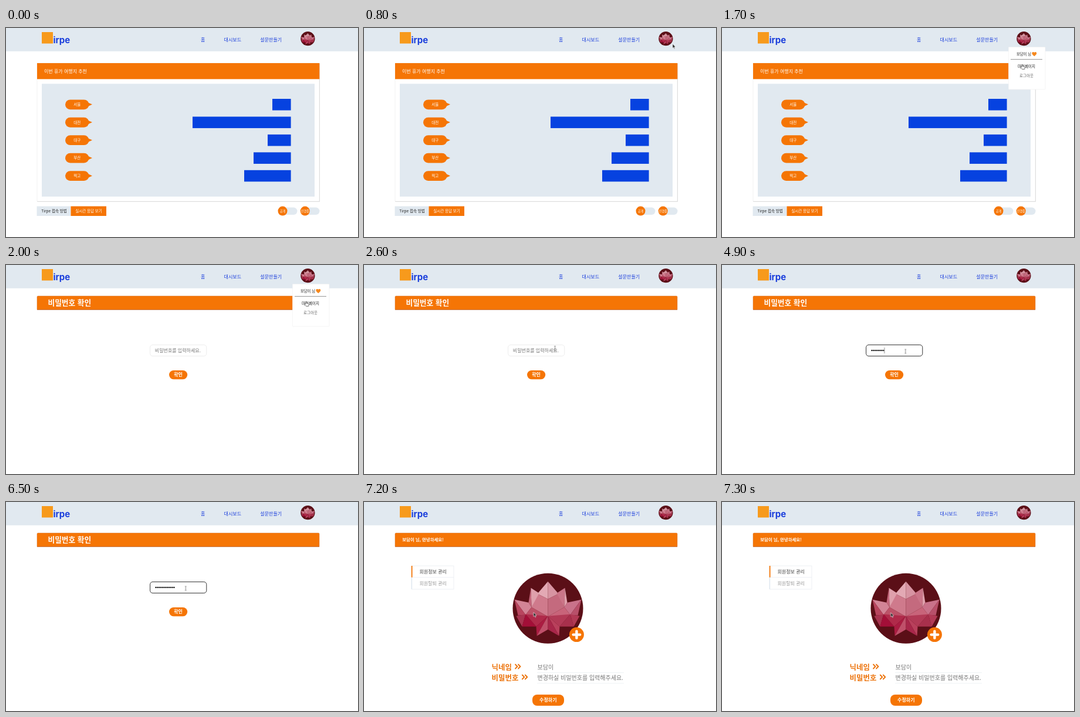
An HTML page that plays this animation: 600x357 px, repeating every 8 s.

```html
<!DOCTYPE html>
<html lang="ko">
<head>
<meta charset="utf-8">
<title>Profile flow</title>
<style>
html, body { margin: 0; width: 100%; height: 100%; overflow: hidden; background: #fff; }
svg { display: block; width: 600px; height: 357px; }
text { font-family: "Noto Sans CJK KR", "Noto Sans CJK", "Noto Sans KR", sans-serif; font-size: 8px; }
.mid { text-anchor: middle; }
.bold { font-weight: 700; }
.head { font-size: 12.7px; font-weight: 700; }
.label { font-size: 12.45px; font-weight: 700; fill: #ec7209; }
.value { font-size: 10px; fill: #777; }
.small { font-size: 6.5px; }
.tiny { font-size: 5.2px; }
.white { fill: #fff; }
.orange { fill: #f57505; }
.pale { fill: #e1e9f0; }
.blue { fill: #1a3edc; }
.gray { fill: #666; }

/* Everything shares one 8 s clock; 1.25% = 100 ms. */
.timed { animation: 8s step-end infinite; }
.result { animation-name: result; }
.confirm { animation-name: confirm; }
.profile { animation-name: profile; }
.menu { animation-name: menu; }
@keyframes result { 0% { opacity: 1 } 25%, 100% { opacity: 0 } }
@keyframes confirm { 0% { opacity: 0 } 25% { opacity: 1 } 87.5%, 100% { opacity: 0 } }
@keyframes profile { 0% { opacity: 0 } 87.5%, 100% { opacity: 1 } }
@keyframes menu { 0% { opacity: 0 } 11.25% { opacity: 1 } 27.5%, 100% { opacity: 0 } }

.field { animation-name: field; }
.hint { animation-name: hint; }
.typing { animation-name: typing; --n: 0; }
.dots { height: 4px; width: calc(var(--n) * 2.83px); }
.shift { transform: translateX(calc(var(--n) * 2.83px)); }
.caret { animation-name: caret; }
@keyframes field { 0% { stroke: #ececec } 36.25%, 100% { stroke: #333 } }
@keyframes hint { 0% { opacity: 1 } 46.25%, 100% { opacity: 0 } }
@keyframes caret { 0% { opacity: 0 } 36.25% { opacity: 1 } 43.75% { opacity: 0 } 46.25% { opacity: 1 } 76.25%, 100% { opacity: 0 } }
@keyframes typing {
  0% { --n: 0 } 46.25% { --n: 2 } 48.75% { --n: 3 } 53.75% { --n: 4 }
  56.25% { --n: 5 } 57.5% { --n: 6 } 58.75% { --n: 7 } 61.25% { --n: 8 }
  65% { --n: 10 } 66.25% { --n: 11 } 68.75%, 100% { --n: 12 }
}

.pointer { animation: move 8s step-end infinite; }
.arrow { animation-name: arrow; }
.hand { animation-name: hand; }
.beam { animation-name: beam; }
@keyframes move {
  0% { transform: translate(562px, 46px) }
  7.5% { transform: translate(562px, 46px); animation-timing-function: steps(4, start) }
  12.5% { transform: translate(514px, 21px); animation-timing-function: steps(5, start) }
  18.75% { transform: translate(511px, 60px) }
  20% { transform: translate(511px, 60px); animation-timing-function: steps(2, start) }
  22.5% { transform: translate(511.5px, 62px) }
  26.25% { transform: translate(511.5px, 62px); animation-timing-function: steps(6, start) }
  33.75% { transform: translate(325.5px, 142px) }
  36.25% { transform: translate(312.7px, 147.5px) }
  81.25% { transform: translate(306.3px, 147.5px) }
  82.5% { transform: translate(306.3px, 147.5px); animation-timing-function: steps(4, start) }
  87.5% { transform: translate(293px, 187px); animation-timing-function: steps(4, start) }
  92.5%, 100% { transform: translate(287.6px, 189px) }
}
@keyframes arrow {
  0% { opacity: 0 } 5% { opacity: 1 } 11.25% { opacity: 0 } 27.5% { opacity: 1 } 32.5% { opacity: 0 }
  83.75% { opacity: 1 } 85% { opacity: 0 } 87.5%, 100% { opacity: 1 }
}
@keyframes hand { 0% { opacity: 0 } 11.25% { opacity: 1 } 27.5% { opacity: 0 } 85% { opacity: 1 } 87.5%, 100% { opacity: 0 } }
@keyframes beam { 0% { opacity: 0 } 32.5% { opacity: 1 } 83.75%, 100% { opacity: 0 } }
</style>
</head>
<body>
<svg viewBox="0 0 600 357">
  <defs>
    <pattern id="dot" x="254" y="144" width="2.83" height="4" patternUnits="userSpaceOnUse">
      <circle cx="1.4" cy="2" r="1.15"/>
    </pattern>
    <g id="lotus"><circle r="60" fill="#5b0f17"/></g>
    <path id="chevrons" d="M0-3.5l3.5 3.5-3.5 3.5M5-3.5l3.5 3.5-3.5 3.5" fill="none" stroke="#ec7209" stroke-width="1.8" stroke-linecap="round" stroke-linejoin="round"/>
    <g id="banner">
      <path d="M53 76.3V54.5q0-1.500 1.500-1.500h478q1.500 0 1.500 1.500v21.800z" fill="#f57505" stroke="#d2691e" stroke-width=".5"/>
      <path d="M53 76.300h481" stroke="#b9602a" stroke-width=".7"/>
    </g>
  </defs>
  <rect width="600" height="357" fill="#fff"/>

  <g class="timed result">
    <rect x="53" y="60.5" width="482" height="236.5" rx="1" fill="#d9d9d9"/>
    <rect x="53" y="60" width="481" height="236" fill="#fff" stroke="#e6e6e6" stroke-width=".6"/>
    <rect class="orange" x="53" y="60" width="481.3" height="27.3"/>
    <text class="white" x="65" y="76.6">이번 휴가 여행지 추천</text>
    <rect class="pale" x="61" y="95.3" width="465" height="192.7"/>
    <g id="rows"></g>
    <rect class="pale" x="52.5" y="304.5" width="58" height="16.5"/>
    <rect class="orange" x="110.5" y="304.5" width="60.5" height="16.5"/>
    <text class="small" x="60.3" y="315.2" fill="#222">Tirpe 접속 방법</text>
    <text class="small white" x="118.3" y="315.2">실시간 응답 보기</text>
    <rect class="pale" x="464" y="306.6" width="32.5" height="12.4" rx="6.2"/>
    <circle class="orange" cx="471.5" cy="312.6" r="8"/>
    <text class="tiny white mid" x="471.5" y="314.5">공개</text>
    <rect class="pale" x="502" y="306.6" width="32.5" height="12.4" rx="6.2"/>
    <circle class="orange" cx="509.7" cy="312.6" r="8"/>
    <text class="tiny white mid" x="509.7" y="314.5">진행중</text>
  </g>

  <g class="timed confirm">
    <use href="#banner"/>
    <text class="head white" x="71.5" y="69">비밀번호 확인</text>
    <rect class="timed field" x="245.6" y="136.4" width="96.2" height="19.2" rx="4.5" fill="#fff"/>
    <text class="timed hint" x="253.8" y="149" fill="#777">비밀번호를 입력하세요.</text>
    <g class="timed typing">
      <rect class="dots" x="254" y="144" fill="url(#dot)"/>
      <g class="shift"><path class="timed caret" d="M254.2 141v10" stroke="#555" stroke-width=".7"/></g>
    </g>
    <rect class="orange" x="278" y="180" width="31.2" height="15.2" rx="7.6"/>
    <text class="white bold mid" x="293.5" y="190.4">확인</text>
  </g>

  <g class="timed profile">
    <use href="#banner"/>
    <text class="white bold" x="65.3" y="67.4" style="font-size:7.4px">보담이 님, 안녕하세요!</text>
    <path d="M81 109h72v40h-72zM81 128.7h72" fill="none" stroke="#e9edf1" stroke-width=".8"/>
    <rect class="orange" x="80.7" y="109" width="1.8" height="19.7"/>
    <rect class="pale" x="80.7" y="129" width="1.4" height="20"/>
    <text x="94.5" y="121.7" fill="#444">회원정보 관리</text>
    <text x="94.5" y="142" fill="#999">회원탈퇴 관리</text>
    <use href="#lotus" x="313.5" y="181.7"/>
    <circle class="orange" cx="362.4" cy="226.6" r="12.5"/>
    <path d="M362.4 220.8v11.6M356.6 226.6h11.6" stroke="#fff" stroke-width="4.4" stroke-linecap="round"/>
    <text class="label" x="217.6" y="286.6">닉네임</text>
    <use href="#chevrons" x="258" y="281"/>
    <text class="label" x="217.6" y="304.6">비밀번호</text>
    <use href="#chevrons" x="269.8" y="299"/>
    <text class="value" x="295.5" y="286">보담이</text>
    <text class="value" x="295.5" y="304">변경하실 비밀번호를 입력해주세요.</text>
    <path d="M295 291.5h148M295 309.7h148" stroke="#eaeff3" stroke-width=".8"/>
    <rect class="orange" x="287" y="329" width="54" height="19" rx="8"/>
    <text class="white bold mid" x="313.8" y="341.4">수정하기</text>
  </g>

  <rect class="pale" width="600" height="39.8"/>
  <rect x="61" y="7" width="19" height="19.5" fill="#f79a1c"/>
  <text class="blue" x="80.5" y="26" style="font:700 15px Inter,sans-serif">irpe</text>
  <g class="blue" font-weight="500">
    <text x="332" y="22.8">홈</text>
    <text x="371.6" y="22.8">대시보드</text>
    <text x="433.3" y="22.8">설문만들기</text>
  </g>
  <use href="#lotus" transform="translate(514.4 18.2) scale(.202)"/>

  <g class="timed menu">
    <rect x="488.3" y="32.5" width="62.7" height="72.5" rx="1" fill="#fff" stroke="#eee" stroke-width=".6"/>
    <text x="502" y="46.6" fill="#222" style="font-size:6.3px">보담이 님</text>
    <path d="M532.3 48.2c-2-1.4-4-3-4-5.1 0-2.4 3-3 4-1 1-2 4-1.4 4 1 0 2.1-2 3.7-4 5.1z" fill="#f6891f"/>
    <path d="M492 53.6h54" stroke="#777" stroke-width=".8"/>
    <text class="small" x="504" y="67.6" fill="#222">마이페이지</text>
    <text class="small gray" x="507" y="84.3">로그아웃</text>
  </g>

  <g class="pointer" stroke-linejoin="round">
    <path class="timed arrow" d="M0 0v7.2l1.7-1.5 1.2 2.7 1.1-.5-1.2-2.6h2.3z" fill="#222" stroke="#fff" stroke-width=".6"/>
    <path class="timed hand" d="M-.8.6q.8-1.2 1.6 0v2.6l3 .6q1.1.4 1 1.6l-.6 3h-4.2l-2.4-3.2q.3-1.1 1.6-.2z" fill="#fff" stroke="#222" stroke-width=".65"/>
    <path class="timed beam" d="M-1.3-3.6q1.3 0 1.3.8 0-.8 1.3-.8M0-2.8v5.6M-1.3 3.6q1.3 0 1.3-.8 0 .8 1.3.8" fill="none" stroke="#555" stroke-width=".7"/>
  </g>
</svg>
<script>
const byId = id => document.getElementById(id);

const answers = [['서울', 454], ['대전', 318], ['대구', 446], ['부산', 422], ['찍고', 406]];
byId('rows').innerHTML = answers.map(([name, left], i) => {
  const y = 130.8 + i * 30.45;
  return `<rect class="orange" x="101" y="${y - 8.4}" width="40.4" height="16.8" rx="8.4"/>
    <path class="orange" d="M139.5 ${y - 3.5}l7.5 3.3-7.5 3.5z"/>
    <text class="small white mid" x="121.3" y="${y + 2.3}">${name}</text>
    <rect x="${left}" y="${y - 9.8}" width="${485.6 - left}" height="19.6" fill="#0642e0"/>`;
}).join('');

// Left half of the flower: facet, its colour, and the colour of its mirror image.
const facets = [
  ['0,-46 -18,-25 0,-16', '#e3a9b4', '#d794a2'],
  ['-18,-25 0,-16 0,14 -28,-2', '#cf7a8c', '#c46a7e'],
  ['-29,-35 -15,-26 -28,-2', '#dfa0ac', '#cb7588'],
  ['-29,-35 -33,-10 -28,-2', '#c4667b', '#dfa0ac'],
  ['-57,-15 -33,-10 -28,-2 -38,11', '#d28496', '#c9728a'],
  ['-57,-15 -51,12 -38,11', '#b8455e', '#b8506a'],
  ['-28,-2 0,14 -38,11', '#bd5268', '#c8647a'],
  ['-54,13 -38,10 -44,31', '#a83450', '#b23a55'],
  ['-38,10 -20,31 -44,31', '#a30f38', '#a8304c'],
  ['-38,10 0,13 -20,31', '#b02a4a', '#b23a56'],
  ['0,13 -20,31 -19,47', '#ab1c42', '#b9405c'],
  ['0,13 -19,47 0,36', '#c0506a', '#a8274a']
];
byId('lotus').innerHTML += facets.map(([points, left, right]) =>
  `<polygon points="${points}" fill="${left}"/><polygon points="${points}" fill="${right}" transform="scale(-1 1)"/>`
).join('');
</script>
</body>
</html>
```
